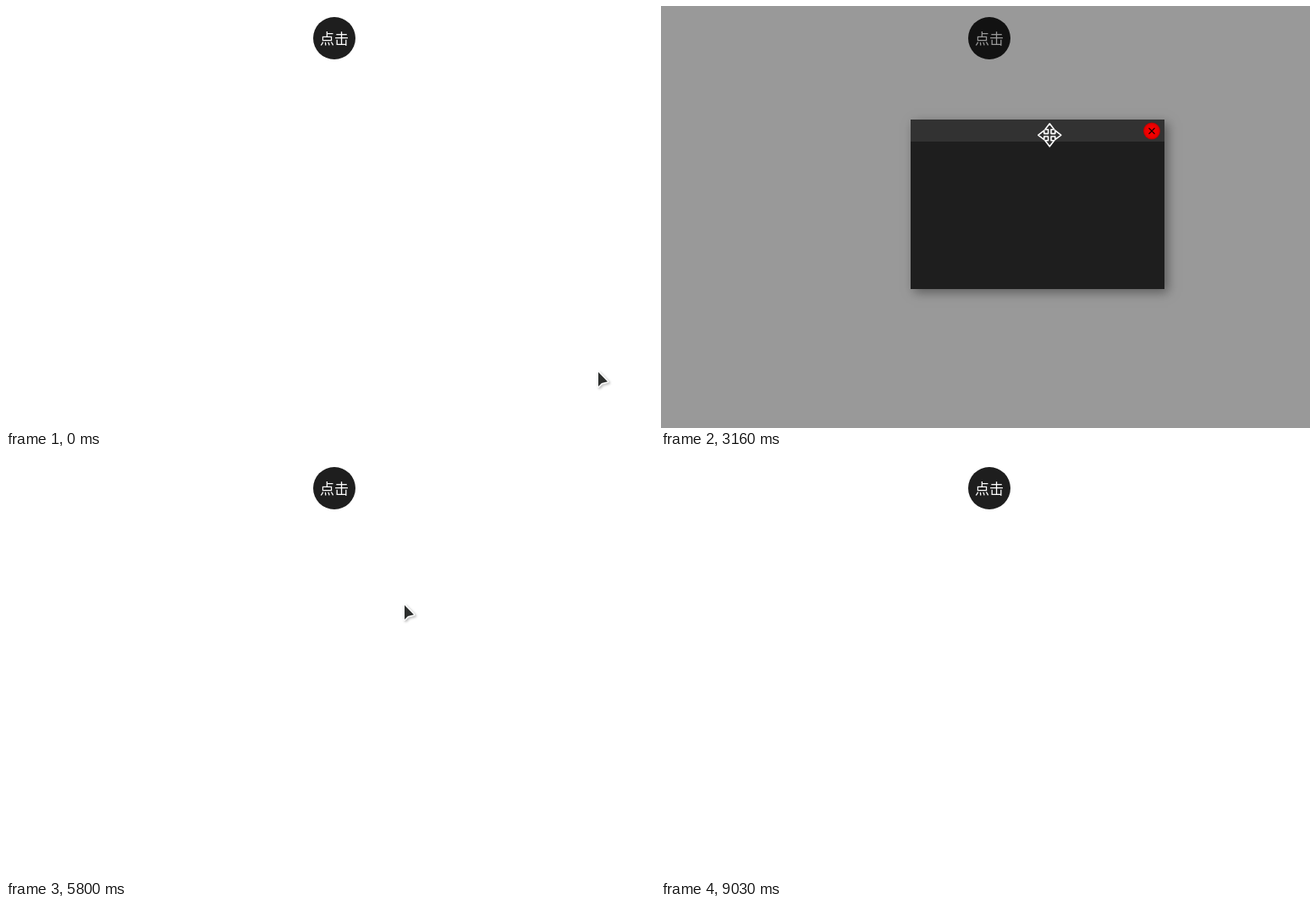
An HTML page with a canvas that plays this animation: 767 by 498 pixels, repeating every 9.46 s.

```html
<!DOCTYPE html>
<html lang="zh">
<head>
<meta charset="utf-8">
<title>Draggable dialog</title>
<style>
html, body { margin: 0; width: 100%; height: 100%; overflow: hidden; background: #fff; }
canvas { display: block; width: 767px; height: 498px; }
</style>
</head>
<body>
<canvas id="stage" width="767" height="498"></canvas>
<script>
const ctx = document.getElementById('stage').getContext('2d');
const LOOP = 9460, W = 767, H = 498;
const BOX_W = 300, BOX_H = 200, BAR_H = 26;
const BUTTON = { x: 388, y: 38, r: 25 };
const START = { box: [238, 282], pointer: [699, 430] };
const LEAVE = 9030;

// Moves run along a smooth curve from the previous place through a few key points.
const move = (from, to, steps, ...keys) => ({ from, to, steps, keys });
// Drags move the dialog; the pointer holds it at the grip offset.
const drag = (grip, ...rest) => ({ grip, ...move(...rest) });

const segments = [
  move(100, 740, 7, [575, 215], [374, 46]),
  move(1310, 1740, 5, [398, 170], [390, 312]),
  move(1960, 2060, 2, [386, 300]),
  drag([148, 18], 2280, 2280, 1, [238, 280]),
  drag([164, 18], 2420, 3160, 8, [188, 235], [200, 124], [295, 134]),
  drag([158, 20], 3280, 4290, 10, [240, 195], [110, 170], [200, 112], [322, 135], [311, 201]),
  drag([150, 18], 4390, 4930, 6, [215, 196], [186, 160], [215, 150], [188, 164]),
  move(5040, 5250, 3, [470, 174]),
  move(6020, 6240, 3, [390, 44]),
  move(6580, 6910, 4, [391, 179]),
  drag([203, 15], 7030, 7700, 7, [235, 116], [279, 118], [199, 166]),
  drag([203, 15], 7790, 7910, 2, [186, 169]),
  move(8030, 8140, 2, [472, 180]),
  move(8470, 8910, 5, [600, 228], [707, 467])
];
const openSpans = [[1080, 5800], [6460, 8360]];
const pressSpans = [[960, 1080], [2280, 2420], [4290, 4390], [5700, 5800], [6350, 6460], [7030, 7140], [8250, 8360]];

const within = (spans, t) => spans.some(([a, b]) => t >= a && t < b);

// Catmull-Rom curve through the points, u from 0 to 1.
function curve(points, u) {
  const last = points.length - 1;
  const i = Math.min(last - 1, Math.floor(u * last)), s = u * last - i;
  const at = k => points[Math.max(0, Math.min(last, k))];
  return [0, 1].map(axis => {
    const [a, b, c, d] = [-1, 0, 1, 2].map(k => at(i + k)[axis]);
    return b + s / 2 * (c - a + s * (2 * a - 5 * b + 4 * c - d + s * (3 * (b - c) + d - a)));
  });
}

function poseAt(t) {
  let { box, pointer } = START;
  for (const { from, to, steps, keys, grip } of segments) {
    if (t < from) break;
    const gap = (to - from) / (steps - 1) || 1;
    const step = Math.min(steps, Math.floor((t - from + 13) / gap) + 1);
    const place = curve([grip ? box : pointer, ...keys], step / steps).map(Math.round);
    if (grip) box = place;
    pointer = grip ? [place[0] + grip[0], place[1] + grip[1]] : place;
  }
  return { box, pointer };
}

function disc(x, y, r, fill) {
  ctx.fillStyle = fill;
  ctx.beginPath();
  ctx.arc(x, y, r, 0, Math.PI * 2);
  ctx.fill();
}

function polygon(points) {
  ctx.beginPath();
  points.forEach(([x, y]) => ctx.lineTo(x, y));
  ctx.closePath();
}

function shadow(color, blur, offset) {
  ctx.shadowColor = color;
  ctx.shadowBlur = blur;
  ctx.shadowOffsetX = ctx.shadowOffsetY = offset;
}

function drawButton(hover) {
  disc(BUTTON.x, BUTTON.y, BUTTON.r, hover ? '#333' : '#1e1e1e');
  ctx.fillStyle = '#fff';
  ctx.font = '17px "Noto Sans CJK SC", "Noto Sans CJK", sans-serif';
  ctx.textAlign = 'center';
  ctx.textBaseline = 'alphabetic';
  ctx.fillText('点击', BUTTON.x, 45);
}

function drawDialog([x, y]) {
  ctx.save();
  shadow('rgba(0,0,0,.4)', 12, 4);
  ctx.fillStyle = '#1e1e1e';
  ctx.fillRect(x, y, BOX_W, BOX_H);
  ctx.restore();
  ctx.fillStyle = '#323232';
  ctx.fillRect(x, y, BOX_W, BAR_H);

  const cx = x + 285, cy = y + 13.5;
  const red = ctx.createRadialGradient(cx, cy, 5, cx, cy, 10);
  red.addColorStop(0, '#f40000');
  red.addColorStop(0.6, '#e80000');
  red.addColorStop(1, '#b80000');
  disc(cx, cy, 10, red);
  ctx.strokeStyle = '#1a0000';
  ctx.lineWidth = 1.1;
  ctx.beginPath();
  for (const s of [-1, 1]) {
    ctx.moveTo(cx - 3.5, cy - 3.5 * s);
    ctx.lineTo(cx + 3.5, cy + 3.5 * s);
  }
  ctx.stroke();
}

function drawArrow(x, y) {
  ctx.save();
  ctx.translate(x, y);
  ctx.lineJoin = 'round';
  polygon([[1, 2], [1, 19], [5, 15], [12, 13.3]]);
  ctx.save();
  shadow('rgba(0,0,0,.28)', 3, 1.5);
  ctx.strokeStyle = '#fff';
  ctx.lineWidth = 3;
  ctx.stroke();
  ctx.restore();
  ctx.fillStyle = '#2d2f2e';
  ctx.fill();
  ctx.restore();
}

function drawMove(x, y) {
  const arm = [[-1.7, -1.7], [-1.7, -6.5], [-5.4, -6.5], [0, -13.5], [5.4, -6.5], [1.7, -6.5]];
  const outline = [];
  for (let q = 0; q < 4; q++) {
    const c = [1, 0, -1, 0][q], s = [0, 1, 0, -1][q];
    arm.forEach(([px, py]) => outline.push([px * c - py * s, px * s + py * c]));
  }
  ctx.save();
  ctx.translate(x + 0.3, y + 0.3);
  ctx.lineJoin = 'round';
  polygon(outline);
  ctx.fillStyle = '#303030';
  ctx.fill();
  ctx.strokeStyle = '#fff';
  ctx.lineWidth = 1.6;
  ctx.stroke();
  ctx.restore();
}

function draw(t) {
  const { box, pointer: [x, y] } = poseAt(t);
  const open = within(openSpans, t);
  const visible = t < LEAVE;
  const hover = visible && !open && Math.hypot(x - BUTTON.x, y - BUTTON.y) < BUTTON.r;

  ctx.fillStyle = '#fff';
  ctx.fillRect(0, 0, W, H);
  drawButton(hover);
  if (open) {
    ctx.fillStyle = 'rgba(0,0,0,.4)';
    ctx.fillRect(0, 0, W, H);
    drawDialog(box);
  }
  if (!visible) return;

  const dx = x - box[0], dy = y - box[1];
  const onBar = open && dx >= 0 && dx < 274 && dy >= 0 && dy < BAR_H;
  (onBar ? drawMove : drawArrow)(x, y);
  if (within(pressSpans, t)) disc(x, y, 12.5, 'rgba(255,255,0,.5)');
}

const start = performance.now();
function tick() {
  draw((performance.now() - start) % LOOP);
  requestAnimationFrame(tick);
}
tick();
</script>
</body>
</html>
```
